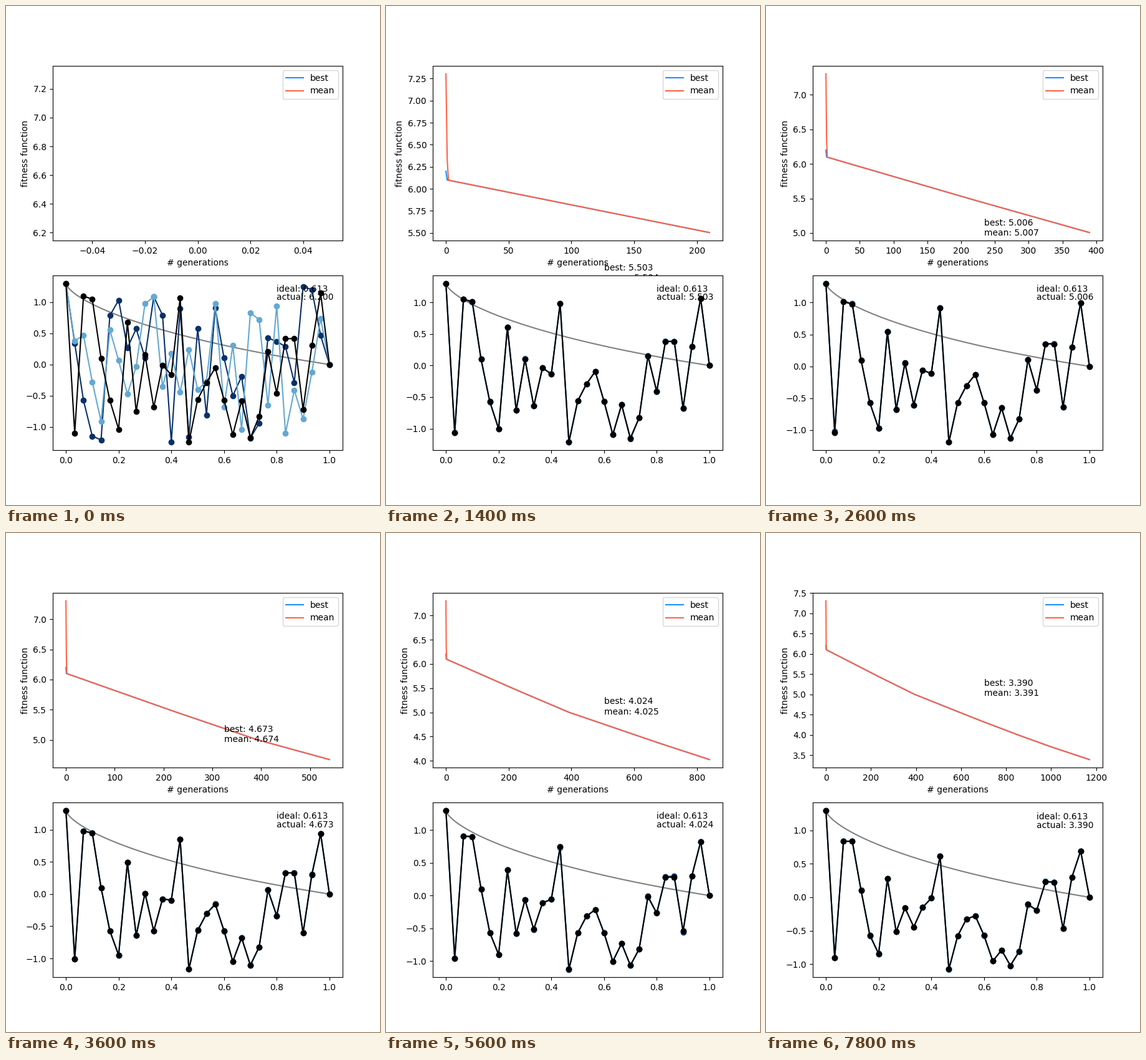
A matplotlib script that plays this animation: 600x800 px, repeating every 8 s.

```python
import numpy as np
import matplotlib.pyplot as plt
from matplotlib.animation import FuncAnimation

FRAMES, INTERVAL, STEP = 40, 200, 30
Y0, IDEAL = 1.3, 0.613

# Bead heights of the best chain, in hundredths, at step MID.
MID = 22
BEADS = [130, -99, 95, 93, 10, -57, -93, 45, -62, -2, -55, -9, -8, 81, -115, -57,
         -31, -18, -57, -103, -70, -109, -82, 3, -31, 31, 31, -58, 30, 89, 0]
chain = np.array(BEADS) / 100
X = np.linspace(0, 1, chain.size)


def tension(y, soft=0.2):
    """Pull of both neighbours on each bead; the ends stay fixed."""
    d = np.diff(y)
    pull = d / np.hypot(d, soft)
    return np.concatenate([[0], (pull[1:] - pull[:-1]) / 2, [0]])


# The path shortens steadily, faster near the top where travel is slow.
speed = tension(chain) * (0.0087 + 0.0037 * chain)

gens = np.arange(FRAMES * STEP)
best = np.interp(gens, [0, 1, 210, 390, 660, 840, 990, 1170],
                 [6.2, 6.1, 5.503, 5.006, 4.406, 4.024, 3.722, 3.39])
mean = best + 0.001
mean[:2] = 7.305, 6.34


def cycloid(n=200):
    """Curve of fastest descent from (0, Y0) to (1, 0)."""
    lo, hi = 0.1, 6.0
    for _ in range(60):
        t = (lo + hi) / 2
        if (1 - np.cos(t)) / (t - np.sin(t)) > Y0:
            lo = t
        else:
            hi = t
    r = Y0 / (1 - np.cos(t))
    a = np.linspace(0, t, n)
    return r * (a - np.sin(a)), Y0 - r * (1 - np.cos(a))


def candidates(k):
    """Two rivals and the best chain: random at first, then nearly equal."""
    top = chain + speed * (k - MID)
    rng = np.random.default_rng(k)
    rivals = np.tile(top, (2, 1))
    inner = rivals[:, 1:-1]
    if k == 0:
        inner[:] = rng.uniform(-1.25, 1.25, inner.shape)
    else:
        inner += rng.normal(0, 0.009, inner.shape) * (rng.random(inner.shape) < 0.2)
    return *rivals, top


fig, (ax1, ax2) = plt.subplots(2, 1, figsize=(6, 8), dpi=100)

best_line, = ax1.plot([], [], color="dodgerblue", label="best")
mean_line, = ax1.plot([], [], color="tomato", label="mean")
ax1.set_xlabel("# generations")
ax1.set_ylabel("fitness function")
ax1.legend(loc="upper right")
score = ax1.text(0, 0.8 * best[0], "")

ax2.plot(*cycloid(), color="gray")
chains = [ax2.plot(X, X, "o-", color=c)[0] for c in ("#08306b", "#63a8d3", "black")]
ax2.set_xlim(-0.05, 1.05)
ax2.text(0.8, 0.9 * Y0, f"ideal: {IDEAL:.3f}")
actual = ax2.text(0.8, 0.8 * Y0, "")


def update(k):
    n = k * STEP
    best_line.set_data(gens[:n + 1], best[:n + 1])
    mean_line.set_data(gens[:n + 1], mean[:n + 1])
    ax1.relim()
    ax1.autoscale_view()
    score.set_x(0.6 * n)
    score.set_text(f"best: {best[n]:.3f}\nmean: {mean[n]:.3f}")

    heights = candidates(k)
    for line, y in zip(chains, heights):
        line.set_ydata(y)
    low = heights[-1].min()
    pad = 0.05 * (Y0 - low)
    ax2.set_ylim(low - pad, Y0 + pad)
    actual.set_text(f"actual: {best[n]:.3f}")
    return best_line, mean_line, score, actual, *chains


anim = FuncAnimation(fig, update, frames=FRAMES, interval=INTERVAL,
                     repeat=True, repeat_delay=0, blit=False)
plt.show()
```
